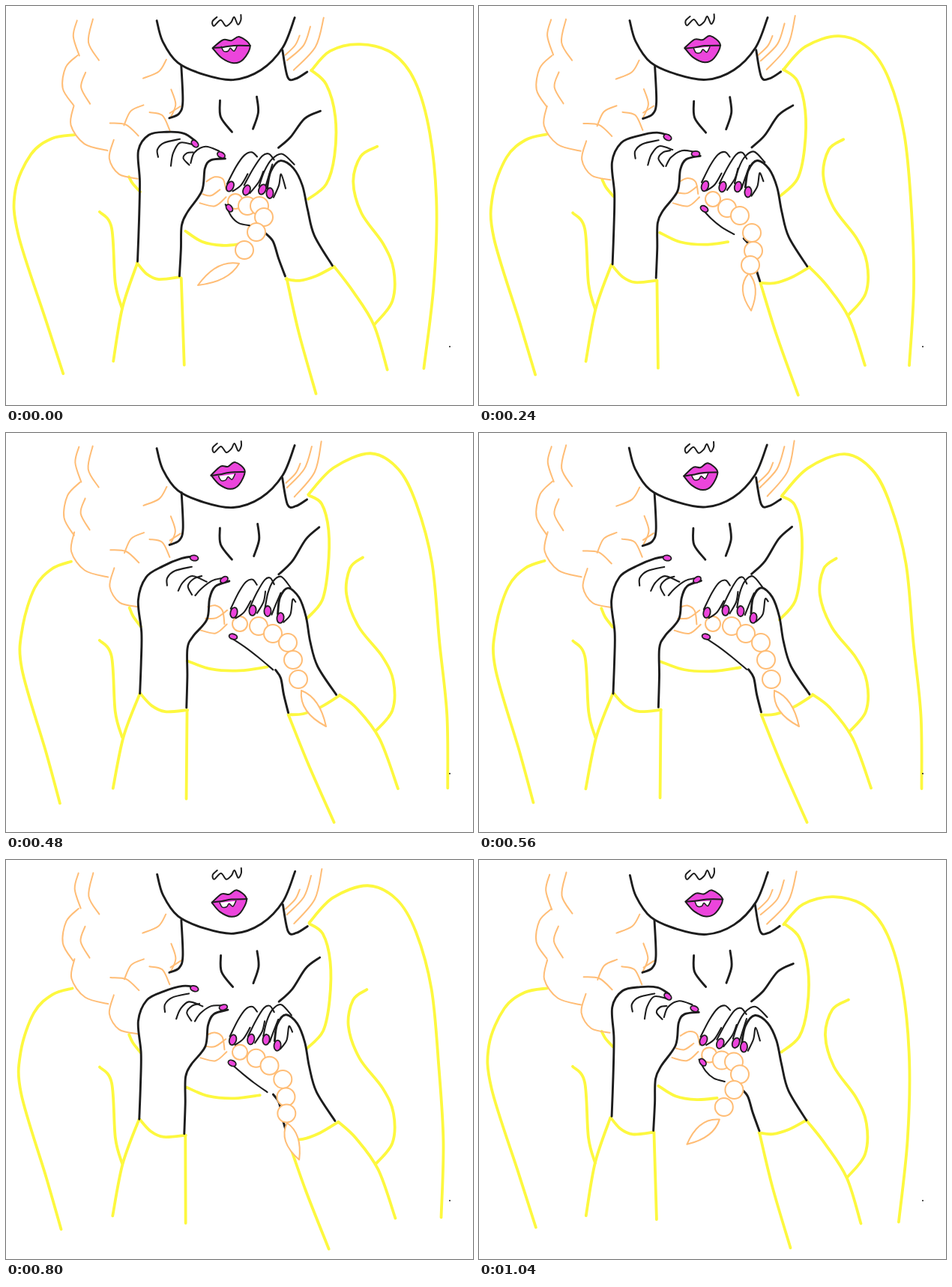
Write an HTML page that moves like this. It is 623 px wide and 533 px high and loops after 1.12 s.

```html
<!DOCTYPE html>
<html lang="en">
<head>
<meta charset="utf-8">
<title>Braiding</title>
<style>
html, body { margin: 0; width: 100%; height: 100%; overflow: hidden; background: #fff; }
svg { display: block; width: 623px; height: 533px; fill: none; stroke-linecap: round; stroke-linejoin: round; }
</style>
</head>
<body>
<svg id="stage" viewBox="0 0 623 533"></svg>
<script>
const YELLOW = '#fdf83f', ORANGE = '#ffbd76', BLACK = '#1d1d1d', PINK = '#ec45dc';
const STEP = 80, LOOP = 14;
// How far each pose has travelled from rest to the far end.
const REACH = [0, .1, .3, .5, .72, .92, 1, 1];

let pose = 0, reach = 0, seed = 1, out = '';

const nums = s => s.split(' ').map(Number);
const mix = (a, b, t) => a + (b - a) * t;
const noise = () => {
  const v = Math.sin(++seed * 12.9898) * 43758.5453;
  return (v - Math.floor(v)) * 2 - 1;
};

// Adds a drift to the points; its pairs are spread evenly along the stroke.
function move(pts, drift) {
  const last = pts.length / 2 - 1, span = drift.length / 2 - 1;
  const jig = [noise() * .8, noise() * .8];
  return pts.map((v, i) => {
    const c = i % 2, u = (i - c) / 2 / last * span;
    const j = Math.floor(u), next = Math.min(span, j + 1);
    return v + jig[c] + mix(drift[2 * j + c], drift[2 * next + c], u - j) * reach;
  });
}

// Smooth curve through x y pairs.
function curve(n) {
  const last = n.length / 2 - 1;
  const at = (i, c) => n[2 * Math.max(0, Math.min(last, i)) + c];
  let d = `M${n[0]} ${n[1]}`;
  for (let i = 0; i < last; i++) {
    const c1 = [0, 1].map(c => at(i, c) + (at(i + 1, c) - at(i - 1, c)) / 6);
    const c2 = [0, 1].map(c => at(i + 1, c) - (at(i + 2, c) - at(i, c)) / 6);
    d += `C${c1} ${c2} ${at(i + 1, 0)} ${at(i + 1, 1)}`;
  }
  return d;
}

const pen = (ink, width, fill = 'none') => (pts, drift = '0 0') => {
  out += `<path d="${curve(move(nums(pts), nums(drift)))}" stroke="${ink}" stroke-width="${width}" fill="${fill}"/>`;
};

function nail(place, drift, rx, ry) {
  const by = nums(drift);
  const [x, y, turn] = nums(place).map((v, i) => v + by[i] * reach);
  out += `<ellipse rx="${rx}" ry="${ry}" transform="translate(${x} ${y}) rotate(${turn})" fill="${PINK}" stroke="${BLACK}" stroke-width="1.8"/>`;
}

function dress() {
  const p = pen(YELLOW, 3.8);
  // left side, inner arm and sleeve
  p('92 172 62 177 34 198 13 247 17 305 54 420 77 491', '-5 -1 9 13 -5 3');
  p('125 275 141 296 146 370 155 404', '0 2');
  p('175 344 155 404 143 475', '4 4 0 0');
  p('175 343 188 358 204 365 232 362', '4 5 10 8');
  p('233 363 237 479', '9 7 4 9');
  // right sleeve and side
  p('374 364 392 366 414 360 437 348', '3 12 8 2');
  p('374 364 390 436 413 518', '3 12 25 2');
  p('437 348 462 381 490 426 508 486', '8 2 5 -21 15 -11');
  p('495 188 473 201 463 235 474 277 503 318 517 353 515 395 492 425', '-19 -21 -1 -17 1 -26');
  p('407 86 432 60 472 51 515 63 545 100 565 170 574 267 570 375 557 484', '-3 -3 15 -23 3 -5 5 13 33 -9');
  // neckline
  p('407 86 427 105 439 148 438 200 427 238 403 258', '-3 -2 -10 -21 -2 -9');
  p('240 301 262 315 289 320 315 318', '2 4 34 -5');
  p('164 229 169 238 179 249', '0 5 0 10');
}

function hair() {
  const p = pen(ORANGE, 2);
  p('94 19 89 40 97 66', '3 -1');
  p('96 66 80 82 76 110 90 132', '2 -1 0 4');
  p('91 133 87 159 105 184 136 193');
  p('143 178 137 203 150 224 175 230', '1 3');
  p('116 17 110 48 124 72');
  p('106 88 100 108 112 130');
  p('214 72 204 88 183 97');
  p('220 111 226 131 219 149');
  p('233 134 219 143');
  // plait at the shoulder
  p('184 133 167 141 158 160');
  p('139 157 160 159 177 174');
  p('191 142 208 146 218 166');
  // strands by the right cheek
  p('424 15 413 54 384 85', '-4 -4 0 0');
  p('406 28 397 53 375 73', '2 -10 0 0');
  p('392 40 386 53 373 66');
  // knot between the hands
  p('268 235 279 229 290 232 294 246', '1 -3 -3 9');
  p('258 264 278 268 293 256', '2 0');
  p('263 252 274 254 286 246', '3 -4 9 -9');
}

// Six bead centres, then the root and tip of the loose end, at rest, halfway and far.
const BRAID = {
  rest: '306 261 322 267 338 267 344 282 334 302 318 326 311 344 256 373',
  half: '312 258 331 270 348 280 364 303 366 327 362 346 360 357 363 407',
  far: '312 255 337 258 356 268 376 280 383 303 390 329 394 344 427 392'
};
function braid() {
  const late = reach > .5;
  const from = nums(late ? BRAID.half : BRAID.rest), to = nums(late ? BRAID.far : BRAID.half);
  const n = from.map((v, i) => mix(v, to[i], late ? reach * 2 - 1 : reach * 2));
  const [sx, sy, tx, ty] = n.slice(12);
  const dx = tx - sx, dy = ty - sy, len = Math.hypot(dx, dy);
  const side = k => `${sx + dx * .38 - dy / len * k} ${sy + dy * .38 + dx / len * k}`;
  const ink = `fill="#fff" stroke="${ORANGE}" stroke-width="2"`;
  out += `<path d="M${sx} ${sy}Q${side(19)} ${tx} ${ty}Q${side(-15)} ${sx} ${sy}" ${ink}/>`;
  for (let i = 0; i < 6; i++) {
    out += `<circle cx="${n[2 * i]}" cy="${n[2 * i + 1]}" r="${i ? 12 : 10}" ${ink}/>`;
  }
}

function body() {
  const p = pen(BLACK, 2.9);
  p('201 20 209 48 229 76 264 92 303 99 340 86 369 56 385 16');
  p('234 80 236 128 231 144 218 150');
  p('369 59 376 95 387 97 402 88');
  p('286 127 287 149 302 169');
  p('335 121 337 142 330 164');
  p('420 140 399 150 380 175 364 189', '-2 -14 3 -5 0 0');
  // hands down to the wrists
  p('253 181 238 171 215 169 191 173 177 194 179 235 178 287 176 342', '-1 -16 -6 13 2 36 3 6');
  p('292 204 273 206 265 217 261 247 242 275 234 293 233 325 231 361', '5 -6 6 6 7 -7 9 6');
  p('349 244 354 221 367 207 384 217 396 240 403 272 412 307 436 347', '14 -3 9 0 3 7 5 2');
}

function fingers() {
  const p = pen(BLACK, 2.1);
  // left
  p('247 210 252 196 267 188 285 194', '6 7 11 14 3 0');
  p('203 202 202 192 211 183 232 178', '12 2 16 1');
  p('220 213 223 196 232 182 248 184', '10 -2 20 15');
  p('244 213 236 204 241 197 249 196', '4 3 12 -5');
  // right
  p('295 237 307 214 318 199 328 195 335 201', '5 -2 0 2');
  p('302 247 313 239 322 224', '4 0');
  p('317 240 329 218 341 201 350 198 357 206', '7 -6 0 -4');
  p('326 250 338 235 344 221', '9 -9 2 -9');
  p('338 240 345 220 355 204 369 197 385 211', '7 -7 -6 -5');
  p('346 245 351 228 356 212', '8 -2 10 2');
  p('357 255 364 239 367 224 373 243', '13 -3 16 6 13 -18');
  p('293 265 301 281 311 290 325 293', '9 9 24 3 32 23');
  nail('252 184 45', '-1 -17 -35', 5.5, 3.6);
  nail('287 199 30', '4 -3 -63', 5.5, 3.6);
  nail('298 270 52', '5 2 -37', 5.5, 3.6);
  nail('299 241 -65', '5 -1 -12', 7, 4.6);
  nail('321 246 -68', '8 -9 -15', 7, 4.6);
  nail('342 245 -65', '7 -7 -24', 7, 4.6);
  nail('352 250 -88', '14 -3 5', 7, 4.6);
}

function face() {
  pen(BLACK, 2)('281 14 275 20 277 26 286 18 293 26 300 21 304 14 309 24 313 18 313 11');
  pen(BLACK, 2, PINK)('276 56 290 45 301 46 312 41 326 53 317 71 304 76 288 69 276 56', '-3 1 -8 -2 -3 1');
  pen(BLACK, 1.5, '#fff')('288 55 291 61 297 61 300 57 305 61 309 54', '-4 2 -3 0');
  pen(BLACK, 2)('276 56 290 55 304 53 326 53', '-2 1 -7 -1');
}

function drawPose(amount, index) {
  reach = amount;
  seed = index * 100 + 1;
  out = '';
  dress();
  pen(BLACK, 3)('347 304 357 315 364 337 373 361', '12 12 3 12');
  braid();
  hair();
  body();
  fingers();
  face();
  return `<g visibility="hidden">${out}</g>`;
}

const stage = document.getElementById('stage');
stage.innerHTML = REACH.map(drawPose).join('') + `<circle cx="592" cy="455" r="1" fill="${BLACK}"/>`;
const poses = [...stage.querySelectorAll('g')];

// Poses run forward, then back.
function show(time) {
  const i = Math.floor(time / STEP) % LOOP;
  pose = Math.min(i, LOOP - i);
  poses.forEach((g, k) => g.setAttribute('visibility', k === pose ? 'visible' : 'hidden'));
}

const start = performance.now();
function tick() {
  show(performance.now() - start);
  requestAnimationFrame(tick);
}
tick();
</script>
</body>
</html>
```
